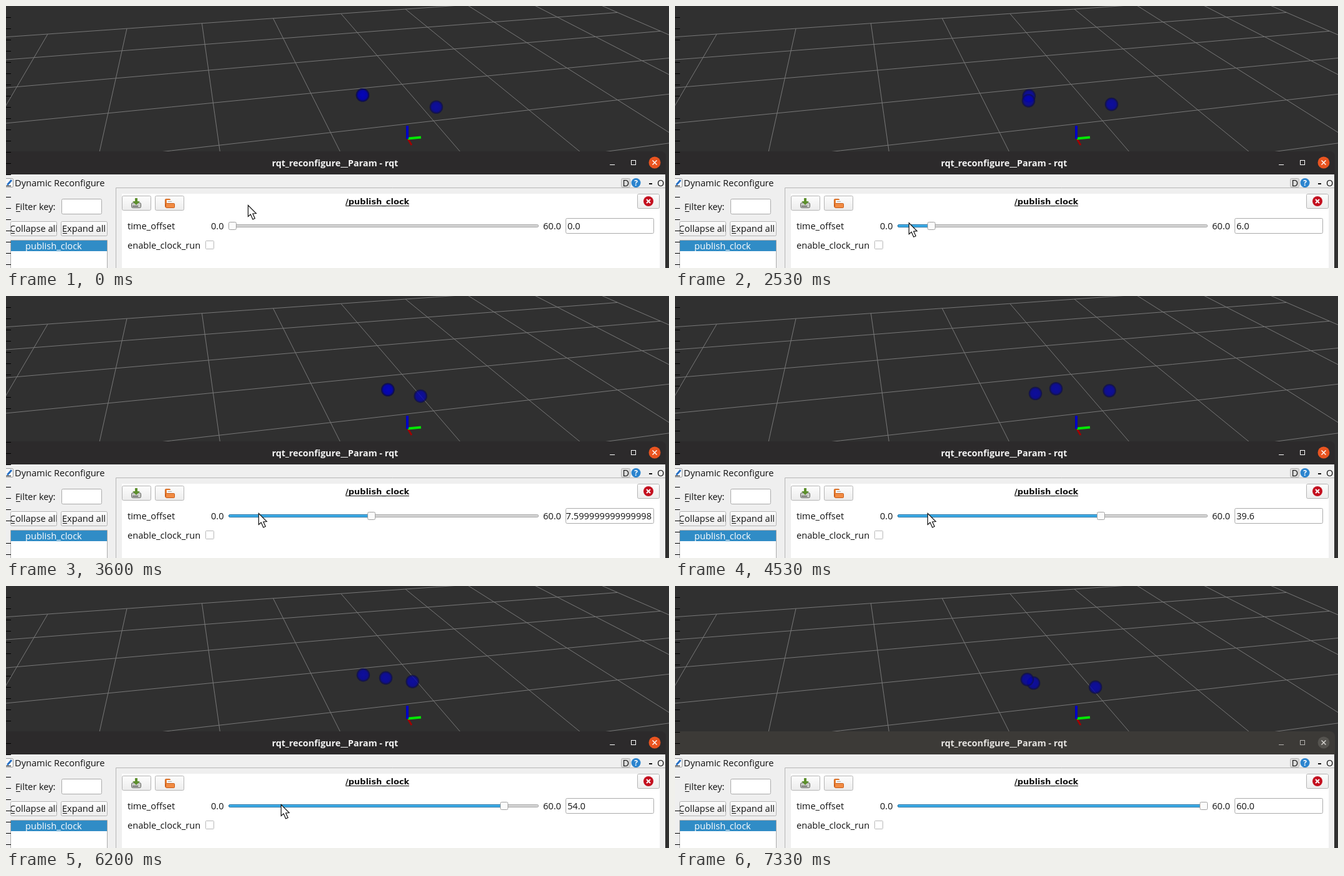
An HTML page with a canvas for the animation above (7.39 s loop, 1064x420 px).

```html
<!DOCTYPE html>
<html lang="en">
<head>
<meta charset="utf-8">
<title>Clock offset slider</title>
<style>
html, body { margin: 0; width: 1064px; height: 420px; overflow: hidden; background: #303030; }
canvas { display: block; }
</style>
</head>
<body>
<canvas id="stage" width="1064" height="420"></canvas>
<script>
const c = document.getElementById('stage').getContext('2d');
const LOOP = 7390, STEP = 200 / 3;
const UI = '14.6px "Open Sans", "Noto Sans", sans-serif';
const BOLD = 'bold 14.4px "Open Sans", "Noto Sans", sans-serif';

const clamp = p => Math.min(1, Math.max(0, p));
const easeOut = p => p * (2 - p);

// Each burst: start, duration, slider steps of 0.6
const BURSTS = [[1665, 1, 1], [2250, 1310, 45], [3600, 530, 20], [4650, 600, 12], [5700, 860, 22]];
const steps = t => BURSTS.reduce((sum, [s, d, n]) => sum + n * clamp((t - s) / d), 0);

// Each move: start, duration, dx, dy
const MOVES = [[130, 670, -21, 28], [2400, 1200, 38, 1], [4660, 1540, 36, 2], [6400, 730, -41, -376]];
const pointerAt = t => MOVES.reduce(([x, y], [s, d, dx, dy]) => {
  const p = easeOut(clamp((t - s) / d));
  return [x + dx * p, y + dy * p];
}, [388, 319]);

// Orbit angles in degrees at a few offsets
const OFFSETS = [0.6, 14.2, 26.6, 39.6, 53.1, 60];
const ANGLES = [[195, 249, 435, 666, 912, 1018], [195, 447, 795, 1165, 1535, 1695]];
function angleAt(angles, v) {
  const i = Math.max(1, OFFSETS.findIndex(o => o >= v));
  const p = (v - OFFSETS[i - 1]) / (OFFSETS[i] - OFFSETS[i - 1]);
  return (angles[i - 1] + (angles[i] - angles[i - 1]) * p) * Math.PI / 180;
}

function rect(x, y, w, h, fill) {
  c.fillStyle = fill;
  c.fillRect(x, y, w, h);
}
function box(x, y, w, h, fill, stroke, r = 2) {
  c.beginPath();
  c.roundRect(x + 0.5, y + 0.5, w - 1, h - 1, r);
  c.fillStyle = fill;
  c.fill();
  c.strokeStyle = stroke;
  c.lineWidth = 1;
  c.stroke();
}
function button(x, y, w, h) {
  const g = c.createLinearGradient(0, y, 0, y + h);
  g.addColorStop(0, '#fdfdfd');
  g.addColorStop(1, '#ececec');
  box(x, y, w, h, g, '#b4b4b4');
}
function line(x1, y1, x2, y2, color, width = 1) {
  c.beginPath();
  c.moveTo(x1, y1);
  c.lineTo(x2, y2);
  c.strokeStyle = color;
  c.lineWidth = width;
  c.stroke();
}
function disc(x, y, r, fill) {
  c.beginPath();
  c.arc(x, y, r, 0, 2 * Math.PI);
  c.fillStyle = fill;
  c.fill();
}
function poly(points, fill) {
  c.beginPath();
  points.forEach(([x, y]) => c.lineTo(x, y));
  c.closePath();
  c.fillStyle = fill;
  c.fill();
}
function cross(x, y, r, color, width) {
  line(x - r, y - r, x + r, y + r, color, width);
  line(x - r, y + r, x + r, y - r, color, width);
}
function text(s, x, y, color = '#111', font = UI, align = 'left') {
  c.font = font;
  c.textAlign = align;
  c.fillStyle = color;
  c.fillText(s, x, y);
}
function mnemonic(s, x, y) {
  text(s, x, y);
  rect(x + 1, y + 2, 7, 1, '#111');
}
function clip(x, y, w, h, draw) {
  c.save();
  c.beginPath();
  c.rect(x, y, w, h);
  c.clip();
  draw();
  c.restore();
}

// Perspective view of the ground plane
function ground(i, j) {
  const w = 1 + 0.0273 * i - 0.0987 * j;
  return [(67 + 132.3 * i - 26.5 * j) / w, (45 - 7.86 * i + 29.5 * j) / w];
}
function grid() {
  for (let i = 0; i <= 8; i++) line(...ground(i, 0), ...ground(i, 6), '#787878');
  for (let j = 0; j <= 5; j++) line(...ground(-1, j), ...ground(8, j), '#787878');
}

function sphere(cx, cy, a) {
  const x = cx + 11.5 * Math.cos(a) + 21.5 * Math.sin(a);
  const y = cy + 8 * Math.cos(a) - 2 * Math.sin(a);
  const g = c.createRadialGradient(x, y, 0, x, y, 11);
  g.addColorStop(0, 'rgba(2,2,195,.74)');
  g.addColorStop(0.65, 'rgba(2,2,176,.74)');
  g.addColorStop(0.85, 'rgba(10,10,95,.78)');
  g.addColorStop(1, 'rgba(18,18,62,.8)');
  disc(x, y, 10.8, g);
}

function scene(t) {
  rect(0, 0, 1064, 420, '#303030');
  grid();
  const offset = Math.max(0.6, steps(t - 90) * 0.6);
  ANGLES.forEach(angles => sphere(589, 150, angleAt(angles, offset)));
  sphere(676.5, 154.3, offset * 0.2);
  line(645, 213, 651, 223, '#a00000', 3);
  line(645, 212.5, 666, 210.5, '#00e800', 4);
  line(644, 192, 644, 213, '#0000c4', 4);
}

function titleBar(active) {
  c.beginPath();
  c.roundRect(-10, 233, 1069, 50, 8);
  c.fillStyle = active ? '#2c2a2b' : '#3c3a37';
  c.fill();
  const ink = active ? '#fff' : '#b5b3b0';
  text('rqt_reconfigure__Param - rqt', 528, 257, active ? '#f4f4f4' : '#e6e4e1', BOLD, 'center');
  line(969, 254.5, 977, 254.5, ink);
  c.strokeRect(1003.5, 247.5, 7, 7);
  disc(1041, 251, 9.5, active ? '#e95420' : '#55534f');
  cross(1041, 251, 3.5, active ? '#fff' : '#d5d3d0', 1.4);
}

function sidebar() {
  box(-3, 276, 15, 15, '#f8f8f8', '#999');
  line(2, 287, 9, 279, '#2670c4', 3);
  text('Dynamic Reconfigure', 14, 289);
  mnemonic('Filter key:', 15, 327);
  box(89, 309, 65, 25, '#fff', '#aaa');
  button(7, 345, 75, 24);
  clip(8, 345, 73, 24, () => mnemonic('Collapse all', 6, 362));
  button(88, 345, 75, 24);
  mnemonic('Expand all', 90, 362);
  box(7, 375, 156, 50, '#fff', '#aaa', 0);
  rect(8, 376, 154, 17, '#308cc6');
  text('publish_clock', 31, 390, '#fff');
}

function toolIcons() {
  button(186, 304, 47, 24);
  box(201, 315, 16, 9, '#c9cac5', '#5f615d');
  rect(203, 320, 9, 2, '#777');
  poly([[207, 308], [211, 308], [211, 313], [215, 313], [209, 319], [203, 313], [207, 313]], '#5c8f2c');
  button(239, 304, 47, 24);
  box(255, 309, 9, 14, '#ee8434', '#c85c18', 1);
  rect(258, 311, 10, 8, '#f5f5f5');
  rect(260, 313, 6, 1, '#aaa');
  box(256, 316, 15, 8, '#f18b43', '#c85c18', 1);
  button(1013, 301, 36, 24);
  disc(1031, 313, 8, '#c4101f');
  cross(1031, 313, 3, '#fff', 2);
}

function slider(n) {
  const x = 363.5 + n * 4.848;
  box(357, 350, 498, 5, '#d4d4d4', '#a8a8a8');
  if (n) box(357, 350, x - 357, 5, '#3daee9', '#246fa0');
  box(Math.round(x - 6.5), 346, 13, 13, '#fbfbfb', '#a0a0a0');
}

function valueField(n) {
  const value = n * 0.6;
  const label = Number.isInteger(value) ? value.toFixed(1) : String(value);
  box(898, 340, 142, 25, '#fff', '#aaa');
  // Long values scroll to their end
  clip(899, 341, 138, 23, () => label.length > 6
    ? text(label, 1036, 358, '#111', UI, 'right')
    : text(label, 901, 358));
}

function panel(n) {
  rect(0, 270, 1058, 150, '#efefef');
  box(176, 291, 900, 140, '#efefef', '#b5b5b5', 0);
  rect(1058, 270, 6, 150, '#303030');
  rect(186, 301, 863, 119, '#fff');
  sidebar();

  box(987, 276, 15, 15, '#dcdcdc', '#b5b5b5');
  text('D', 989.5, 289);
  disc(1011, 283.5, 7.5, '#2b84cf');
  text('?', 1011, 288, '#fff', 'bold 12px "Open Sans", sans-serif', 'center');
  rect(1032, 284, 5, 2, '#111');
  text('O', 1045, 289);

  toolIcons();
  text('/publish_clock', 596, 318, '#111', 'bold 13px "DejaVu Sans", sans-serif', 'center');
  rect(545, 320, 102, 1, '#111');
  text('time_offset', 195, 358);
  text('0.0', 329, 358);
  text('60.0', 862, 358);
  slider(n);
  valueField(n);
  text('enable_clock_run', 195, 389);
  box(320, 376, 14, 14, '#fff', '#b8b8b8', 1);
}

// Black dashes on the left edge flicker at random
function edgeTicks(k) {
  for (let i = 1; i < 24; i++) {
    const noise = Math.abs(Math.sin(k * 12.99 + i * 78.23) * 43758.5) % 1;
    if (k === 0 || noise > 0.08) rect(0, i * 18, 8, 1, '#000');
  }
}

function pointer(x, y) {
  c.save();
  c.translate(x + 0.5, y + 0.5);
  poly([[0, 0], [0, 18], [4, 14.5], [7.5, 22.5], [11, 21], [7.5, 13.5], [13, 13]], '#fff');
  c.strokeStyle = '#111';
  c.lineWidth = 1.2;
  c.stroke();
  c.restore();
}

const start = performance.now();
function frame() {
  const now = (performance.now() - start) % LOOP;
  const k = Math.floor((now + 4) / STEP), t = k * STEP;
  scene(t);
  titleBar(t < 7190);
  panel(Math.floor(steps(t) + 0.01));
  edgeTicks(k);
  pointer(...pointerAt(t));
  requestAnimationFrame(frame);
}
frame();
</script>
</body>
</html>
```
